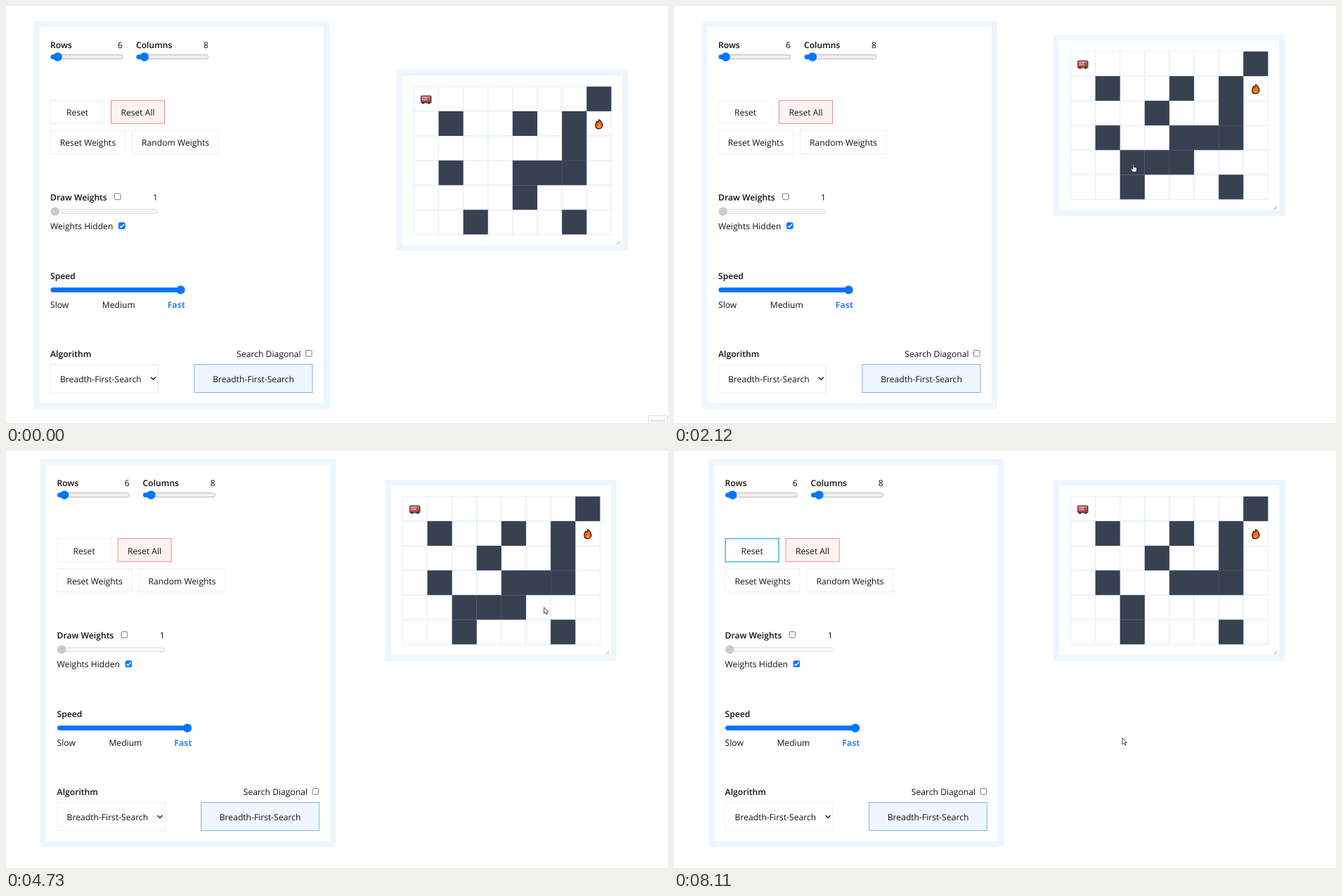
An HTML page for the animation above (8.18 s loop, 942 by 594 pixels).

```html
<!DOCTYPE html>
<html lang="en">
<head>
<meta charset="utf-8">
<title>Path search</title>
<style>
html, body { margin: 0; width: 100%; height: 100%; overflow: hidden; background: #fff; }
svg { display: block; width: 942px; height: 594px; }
text { font: 12.15px "Open Sans", "Noto Sans", sans-serif; fill: #111; text-rendering: geometricPrecision; }
.bold { font-weight: 600; }
</style>
</head>
<body>
<svg id="stage" viewBox="0 0 942 594"></svg>
<script>
const LOOP = 8180, CELL = 35.1, MAP_X = 24.5, MAP_Y = 23.8;
const BLUE = '#0075ff', PALE = '#edf5fe', LINE = '#eceff3', WALL = '#384152';
const layout = [
  '.......#',
  '.#..#.#.',
  '......#.',
  '.#..###.',
  '....#...',
  '..#...#.'
];
const ROWS = layout.length, COLS = layout[0].length;
const stage = document.getElementById('stage');

function el(tag, attrs, parent = stage, content = '') {
  const node = document.createElementNS('http://www.w3.org/2000/svg', tag);
  set(node, attrs);
  node.textContent = content;
  parent.appendChild(node);
  return node;
}
function set(node, attrs) {
  for (const key in attrs) node.setAttribute(key, attrs[key]);
}
const show = (node, visible) => { node.style.display = visible ? '' : 'none'; };
const box = (parent, x, y, width, height, fill, stroke = 'none', rx = 0) =>
  el('rect', { x, y, width, height, fill, stroke, rx }, parent);
const label = (parent, x, y, words, anchor = 'start', bold = false) =>
  el('text', { x, y, 'text-anchor': anchor, class: bold ? 'bold' : '' }, parent, words);
const path = (parent, d, fill, stroke = 'none', width = 1) =>
  el('path', { d, fill, stroke, 'stroke-width': width, 'stroke-linejoin': 'round' }, parent);

function panel(x, y, width, height) {
  const group = el('g', {});
  box(group, x, y, width, height, PALE);
  box(group, x + 8, y + 8, width - 16, height - 16, '#fff');
  return { group, content: el('g', {}, group) };
}

// Controls
const controls = panel(39.5, 21.5, 420.5, 552.5);
const ui = controls.content;

function slider(x, y, width, thumb, track, edge, color, filled = true) {
  box(ui, x + .5, y - 3, width - 1, 6, track, edge, 3);
  if (filled) box(ui, x, y - 3.3, thumb - x, 6.6, color, 'none', 3.3);
  el('circle', { cx: thumb, cy: y, r: 6.2, fill: color }, ui);
}
function button(x, y, width, height, words, fill = '#fff', stroke = LINE) {
  const face = box(ui, x + .5, y + .5, width - 1, height - 1, fill, stroke);
  label(ui, x + width / 2, y + height / 2 + 5.4, words, 'middle');
  return face;
}
function checkbox(x, y, checked) {
  box(ui, x + .5, y + .5, 8.6, 8.6, checked ? BLUE : '#fff', checked ? BLUE : '#767676', 1.5);
  if (checked) path(ui, `M${x + 2} ${y + 5}l2 2 4-4.5`, 'none', '#fff', 1.5);
}
function sizeSlider(x, name, value) {
  label(ui, x, 60.3, name, 'start', true);
  label(ui, x + 103, 60.3, value, 'end');
  slider(x + .5, 72.5, 103, x + 6.7 + value * .65, '#efefef', '#bcbcbc', BLUE);
}

sizeSlider(63, 'Rows', ROWS);
sizeSlider(185, 'Columns', COLS);
const reset = button(63, 134, 77, 34, 'Reset');
button(149, 134, 77, 34, 'Reset All', '#fef2f2', '#e88f8a');
button(63, 177, 107, 34, 'Reset Weights');
button(179, 177, 124, 34, 'Random Weights');
label(ui, 63, 276.8, 'Draw Weights', 'start', true);
checkbox(154, 266.7, false);
label(ui, 216, 276.8, '1', 'end');
slider(63.5, 292.7, 153, 69.7, '#f6f6f6', '#dddddd', '#cbcbcb', false);
label(ui, 63, 318.3, 'Weights Hidden');
checkbox(160, 308.2, true);
label(ui, 63, 388.5, 'Speed', 'start', true);
slider(63.5, 404.4, 185, 248.5, BLUE, 'none', BLUE);
label(ui, 63, 430, 'Slow');
label(ui, 160.3, 430, 'Medium', 'middle');
set(label(ui, 255, 430, 'Fast', 'end', true), { style: 'fill:#3b82f6;font-weight:700' });
label(ui, 63, 500.2, 'Algorithm', 'start', true);
label(ui, 419.5, 500.2, 'Search Diagonal', 'end');
checkbox(426, 490, false);
box(ui, 63.5, 510.5, 153, 40, '#fff', LINE);
label(ui, 77, 536, 'Breadth-First-Search');
path(ui, 'M206 528.8l3.5 3.5 3.5-3.5', 'none', '#222', 1.5);
const search = button(267.5, 510, 169, 41, 'Breadth-First-Search');

// Board
const board = panel(0, 0, 329, 258);
const map = el('g', { transform: `translate(${MAP_X} ${MAP_Y})` }, board.content);
const eachCell = make => Array.from({ length: ROWS * COLS }, (_, i) =>
  make(i % COLS * CELL, Math.floor(i / COLS) * CELL));
eachCell((x, y) => box(map, x, y, CELL, CELL, 'none', '#e2effc'));
const cells = eachCell((x, y) => box(map, x, y, CELL, CELL, 'none'));
path(board.content, 'M313 249l5-5M316.5 249l1.5-1.5', 'none', '#999', .9);

const truck = el('g', { transform: 'translate(17.3 18.8)' }, map);
box(truck, -7.2, -5.6, 14.4, 10, '#cf5d56', '#47282d', 1);
path(truck, 'M-6-3.5H6M-6-.6H2', 'none', '#d9cacc', 1.2);
box(truck, 3.4, -2.6, 2.6, 3, '#cfe3ec', '#4b2a30');
path(truck, 'M-6.5 2.7H6.5', 'none', '#8f3a38', 1.2);
for (const cx of [-4, 4]) el('circle', { cx, cy: 4.5, r: 1.7, fill: '#333' }, truck);
const fire = el('g', { transform: `translate(${CELL * 7.5} ${CELL * 1.5 + .7})` }, map);
path(fire, 'M0-6.5C4-4 5-1.5 5 2C5 5 2.5 6.7 0 6.7C-3 6.7-5 5-5 2C-5-1-3.5-2-3-4L-1.5-2.5C-.3-4 .2-5 0-6.5Z', '#f36a13', '#20110b', 1.2);
path(fire, 'M.5 1C2 2.5 2.3 5.5 0 5.6C-2.3 5.5-1.6 3.5-.4 2.5Z', '#ffa62e');

const record = el('g', {});
box(record, 914.5, 583.5, 26, 14, '#fff', '#dcdcdc', 1);
set(label(record, 927.5, 593, 'Record', 'middle'), { style: 'font-size:6.3px;fill:#b5b5b5' });

// Pointer
const pointer = el('g', {});
const glow = el('circle', { r: 6.5, fill: '#fbf25c' }, pointer);
const shapes = {
  arrow: path(pointer, 'M0 0V8.8L2 7L3.4 10L5 9.3L3.6 6.4H6.2Z', '#fff', '#333', .9),
  hand: path(pointer, 'M0-2C0-3.2 1.7-3.2 1.7-2V1.5L4.9 2.2C5.7 2.5 5.8 3 5.7 4L4.9 8.5H0L-2.8 4.6C-3.1 3.5-2 3.1-1.3 3.8L0 5Z', '#fff', '#222', .9),
  fist: path(pointer, 'M-3-1.6C-2.6-3.2 2-3.6 3-2.2C3.6-1 3.3 1.6 2 3.3H-1.8C-3.4 1.5-3.7-.2-3-1.6Z', '#fbf25c', '#444', .9)
};

// Motion: drags ease between resting places along a swaying arc
const progress = (t, from, to) => Math.min(1, Math.max(0, (t - from) / (to - from)));
const mix = (a, b, k) => a.map((v, i) => v + (b[i] - v) * k);
const add = (a, b) => a.map((v, i) => v + b[i]);
function drag(t, from, to, a, b, sway) {
  const k = progress(t, from, to), lift = Math.sin(Math.PI * k);
  return add(mix(a, b, k * k * (3 - 2 * k)), sway.map(v => v * lift));
}

const home = [556, 91], aside = [404, 27], rest = [540, 41];
const boardAt = t => t < 1060
  ? drag(t, 520, 980, home, aside, [-40, 230])
  : drag(t, 1330, 1720, aside, rest, [90, 240]);

const lifted = [121.5, -119.5], lowered = [-1.5, -8], docked = [9.6, -9.8];
function controlsAt(t) {
  if (t < 2730) return drag(t, 2330, 2730, [0, 0], lifted, [-90, 90]);
  if (t < 3740) return drag(t, 2800, 3470, lifted, lowered, [250, 110]);
  return drag(t, 3740, 3860, lowered, docked, [0, 0]);
}

const boardGrip = t => add(boardAt(t), [113, 187]);
const controlGrip = t => add(controlsAt(t), mix([120.5, 350.5], [282.5, 292], progress(t, 2800, 3470)));
const cellSpot = i => t => add(boardAt(t), [MAP_X + (i % COLS + .5) * CELL, MAP_Y + (Math.floor(i / COLS) + .5) * CELL]);
const fixed = (x, y) => () => [x, y];
const onSearch = fixed(377, 522), onReset = fixed(111, 143);

// The pointer glides from stop to stop
const stop = (from, to, spot, mode = 'idle', cell = -1) => ({ from, to, spot, mode, cell });
const toggle = (from, i, spot = cellSpot(i)) => stop(from, from + 70, spot, 'click', i);
const stops = [
  stop(70, 70, fixed(920, 580)),
  toggle(250, 19),
  toggle(390, 35),
  stop(520, 980, boardGrip, 'drag'),
  stop(1060, 1220, fixed(362, 288), 'press'),
  stop(1330, 1790, boardGrip, 'drag'),
  toggle(2040, 34, boardGrip),
  stop(2110, 2190, boardGrip, 'hover'),
  stop(2330, 4140, controlGrip, 'drag'),
  stop(4650, 4650, cellSpot(38)),
  toggle(4860, 36),
  toggle(5130, 35),
  stop(5900, 6130, onSearch, 'hover'),
  stop(6130, 6270, onSearch, 'click'),
  stop(6270, 6850, onSearch, 'hover'),
  stop(7580, 7710, onReset, 'hover'),
  stop(7710, 7780, onReset, 'click'),
  stop(8110, LOOP, fixed(638, 409))
];
function pointerAt(t) {
  const next = stops.find(s => s.to > t), last = stops[stops.indexOf(next) - 1];
  if (!last || t >= next.from) return { ...next, place: next.spot(t) };
  const place = mix(last.spot(last.to), next.spot(next.from), progress(t, last.to, next.from));
  return { mode: 'idle', place };
}

const drawn = [...layout.join('')].map(mark => mark === '#');
const isWall = (i, t) => stops.reduce((wall, s) => wall !== (s.cell === i && t >= s.from), drawn[i]);

function breadthFirst(start, goal, t) {
  const from = new Map([[start, null]]), queue = [start];
  for (const i of queue) {
    if (i === goal) break;
    for (const [dr, dc] of [[-1, 0], [0, 1], [1, 0], [0, -1]]) {
      const r = Math.floor(i / COLS) + dr, c = i % COLS + dc, n = r * COLS + c;
      if (r < 0 || c < 0 || r >= ROWS || c >= COLS || from.has(n) || isWall(n, t)) continue;
      from.set(n, i);
      queue.push(n);
    }
  }
  const route = [];
  for (let i = goal; i !== null; i = from.get(i)) route.unshift(i);
  return { order: queue, route };
}
const { order, route } = breadthFirst(0, 15, 6000);

function cellColor(i, t) {
  if (isWall(i, t)) return WALL;
  if (t < 6260 || t >= 7780) return 'none';
  const step = route.indexOf(i), seen = order.indexOf(i);
  if (step >= 0 && t >= 6790 + step * 35) return '#fde68a';
  return seen >= 0 && t >= 6260 + seen * 390 / order.length ? '#bfdbfe' : 'none';
}

let front;
function draw(t) {
  const { mode, spot, place } = pointerAt(t);
  const boardOnTop = t < 1060 || (t >= 1330 && t < 2330);
  const top = boardOnTop ? board : controls;
  if (top !== front) stage.insertBefore((front = top).group, record);
  set(board.group, { transform: `translate(${boardAt(t)})` });
  set(controls.group, { transform: `translate(${controlsAt(t)})` });
  set(board.content, { opacity: mode === 'drag' && spot === boardGrip ? .5 : 1 });
  set(ui, { opacity: mode === 'drag' && spot === controlGrip ? .5 : 1 });
  cells.forEach((cell, i) => set(cell, { fill: cellColor(i, t) }));

  const active = mode === 'click' && spot === onSearch, focused = t >= 7780;
  set(search, { fill: active ? '#dbeafe' : '#eff6ff', stroke: active ? '#4f93f2' : '#7fb0f8', 'stroke-width': active ? 1.5 : 1 });
  set(reset, { stroke: focused ? '#62bfd2' : LINE, 'stroke-width': focused ? 1.8 : 1 });

  show(record, t < 70);
  show(pointer, t >= 70);
  set(pointer, { transform: `translate(${place})` });
  const shape = { drag: 'fist', click: 'hand', hover: 'hand' }[mode] || 'arrow';
  for (const name in shapes) show(shapes[name], name === shape);
  show(glow, ['drag', 'click', 'press'].includes(mode));
}

const began = performance.now();
function tick() {
  draw((performance.now() - began) % LOOP);
  requestAnimationFrame(tick);
}
tick();
</script>
</body>
</html>
```
